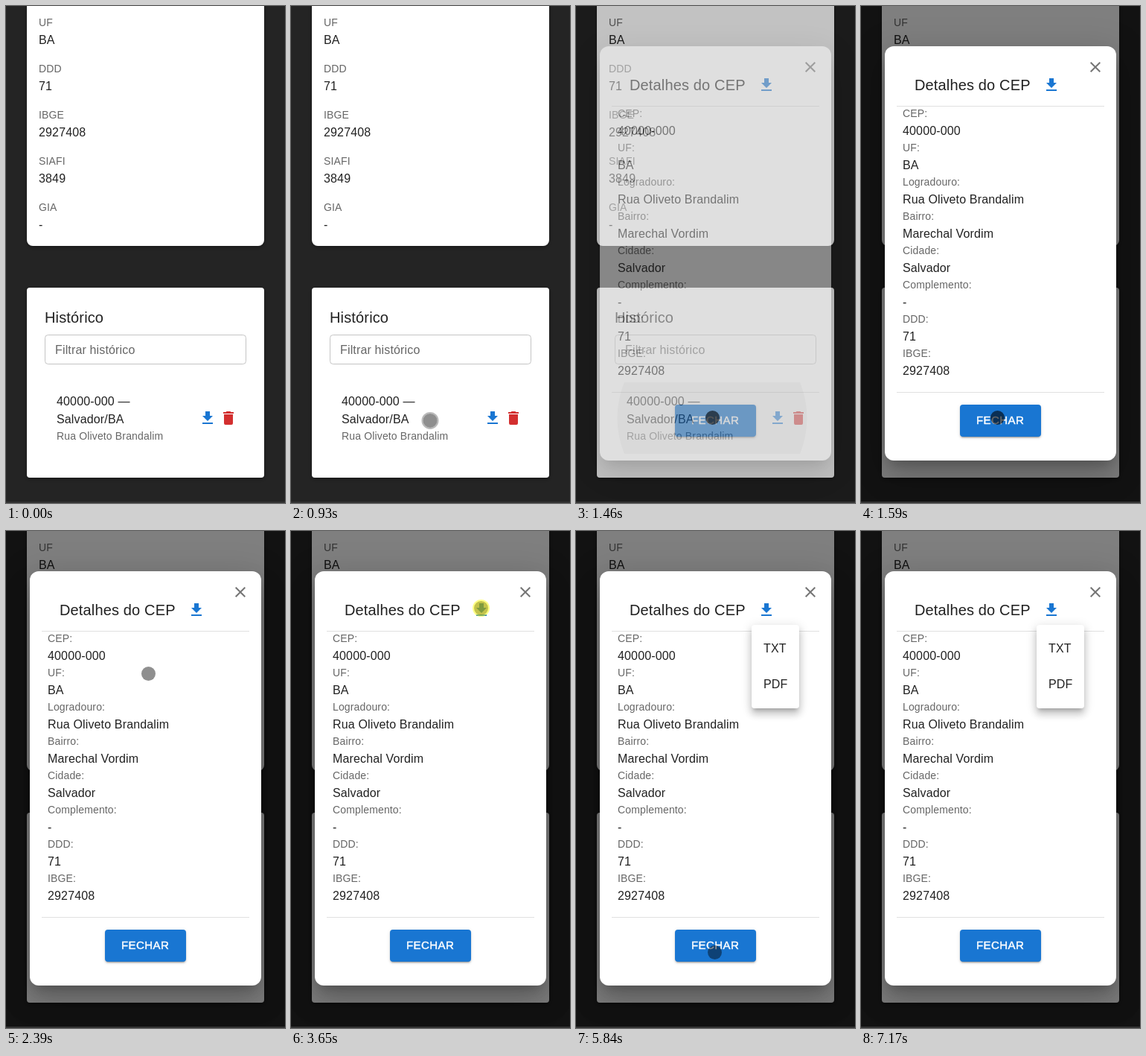
An HTML page for the animation above (7700 ms loop, 375 by 667 pixels).

```html
<!DOCTYPE html>
<html lang="pt-BR">
<head>
<meta charset="utf-8">
<title>Detalhes do CEP</title>
<style>
  html, body { margin: 0; width: 100%; height: 100%; overflow: hidden; background: #242424; }
  #stage { position: relative; width: 375px; height: 667px; overflow: hidden; }
  .layer, svg { position: absolute; left: 0; top: 0; width: 375px; height: 667px; }
  .panel { position: absolute; background: #fff; }
  .card { left: 28px; width: 319px; box-shadow: 0 2px 4px rgba(0,0,0,.3); }
  #result { top: -20px; height: 342px; border-radius: 8px; }
  #history { top: 378px; height: 255px; border-radius: 4px; }
  #backdrop { background: rgba(0,0,0,.5); }
  #paper {
    left: 32px; top: 54px; width: 311px; height: 556px; border-radius: 12px;
    box-shadow: 0 11px 15px -7px rgba(0,0,0,.2), 0 24px 38px 3px rgba(0,0,0,.14), 0 9px 46px 8px rgba(0,0,0,.12);
  }
  #close {
    left: 133px; top: 535px; width: 109px; height: 42.5px; border-radius: 4px; background: #1976d2;
    box-shadow: 0 3px 1px -2px rgba(0,0,0,.2), 0 2px 2px rgba(0,0,0,.14), 0 1px 5px rgba(0,0,0,.12);
  }
  #menu { transform-origin: 236px 126px; }
  #menu .panel {
    left: 236px; top: 126px; width: 64px; height: 112px; border-radius: 4px;
    box-shadow: 0 5px 5px -3px rgba(0,0,0,.2), 0 8px 10px 1px rgba(0,0,0,.14), 0 3px 14px 2px rgba(0,0,0,.12);
  }
  #edge { position: absolute; left: 0; top: 665px; width: 375px; height: 2px; background: #333; }
  text { font: 16px "Liberation Sans", Arial, sans-serif; letter-spacing: .15px; fill: #212121; white-space: pre; }
  .label { font-size: 14px; fill: #666; }
  .title { font-size: 20px; }
  .hint { fill: #666; }
  .button { font-size: 15px; letter-spacing: .43px; fill: #fff; stroke: #fff; stroke-width: .45px; }
</style>
</head>
<body>
<div id="stage">
  <div class="layer">
    <div class="panel card" id="result"></div>
    <div class="panel card" id="history"></div>
    <svg id="pageArt">
      <clipPath id="row"><rect x="52" y="505" width="271" height="96"/></clipPath>
      <rect x="52.5" y="441.5" width="270" height="39" rx="4" fill="none" stroke="#c4c4c4"/>
      <g clip-path="url(#row)"><circle id="rowRipple" cx="183" cy="553"/></g>
    </svg>
  </div>
  <div class="layer" id="backdrop"></div>
  <div class="layer" id="dialog">
    <div class="panel" id="paper"></div>
    <div class="panel" id="close"></div>
    <svg id="dialogArt">
      <path d="M48 134.5H327M48 518.5H327" stroke="#e0e0e0"/>
      <circle id="iconRipple" cx="256" cy="106" fill="#1976d2"/>
    </svg>
  </div>
  <div class="layer" id="menu">
    <div class="panel"></div>
    <svg id="menuArt"></svg>
  </div>
  <div id="edge"></div>
  <svg>
    <g id="cursor">
      <circle id="ring" r="10.5" fill="none" stroke="#000" stroke-opacity=".27" stroke-width="2"/>
      <circle id="core" r="9.5"/>
      <circle id="click" r="11.5" fill="#ff0" fill-opacity=".47"/>
    </g>
  </svg>
</div>
<script>
const LOOP = 7700, TICK = LOOP / 116;
const $ = id => document.getElementById(id);

function add(parent, tag, attrs) {
  const el = document.createElementNS('http://www.w3.org/2000/svg', tag);
  for (const key in attrs) el.setAttribute(key, attrs[key]);
  return parent.appendChild(el);
}
const write = (parent, x, y, words, style = '') =>
  add(parent, 'text', { x, y, class: style }).textContent = words;
const icon = (parent, x, y, d, fill) =>
  add(parent, 'path', { d, fill, transform: `translate(${x} ${y})` });

const DOWNLOAD = 'M5 20h14v-2H5zM19 9h-4V3H9v6H5l7 7z';
const TRASH = 'M6 7h12v12q0 2-2 2H8q-2 0-2-2zM5 4h3.5l1-1h5l1 1H19v2H5z';
const CROSS = 'M5.7 5.7 18.3 18.3M18.3 5.7 5.7 18.3';
const BLUE = '#1976d2';
const CEP = '40000-000', STREET = 'Rua Oliveto Brandalim';

function fields(parent, x, y, pitch, rows) {
  Object.entries(rows).forEach(([label, value], i) => {
    write(parent, x, y + pitch * i, label, 'label');
    write(parent, x, y + pitch * i + 24, value);
  });
}

fields(pageArt, 44, 27, 62, { UF: 'BA', DDD: '71', IBGE: '2927408', SIAFI: '3849', GIA: '-' });
write(pageArt, 52, 425, 'Histórico', 'title');
write(pageArt, 66, 467, 'Filtrar histórico', 'hint');
write(pageArt, 68, 536, CEP + ' —');
write(pageArt, 68, 560, 'Salvador/BA');
write(pageArt, 68, 582, STREET, 'label');
icon(pageArt, 259, 541, DOWNLOAD, BLUE);
icon(pageArt, 287, 541, TRASH, '#d32f2f');

write(dialogArt, 72, 113, 'Detalhes do CEP', 'title');
icon(dialogArt, 244, 94, DOWNLOAD, BLUE);
const cross = icon(dialogArt, 303, 70, CROSS, 'none');
cross.setAttribute('stroke', '#757575');
cross.setAttribute('stroke-width', 2);
fields(dialogArt, 56, 149, 46, {
  'CEP:': CEP, 'UF:': 'BA', 'Logradouro:': STREET, 'Bairro:': 'Marechal Vordim',
  'Cidade:': 'Salvador', 'Complemento:': '-', 'DDD:': '71', 'IBGE:': '2927408'
});
write(dialogArt, 155, 561, 'FECHAR', 'button');
['TXT', 'PDF'].forEach((name, i) => write(menuArt, 252, 163 + 48 * i, name));

const ramp = (t, from, to) => Math.min(1, Math.max(0, (t - from) / (to - from)));
const ease = x => x * x * (3 - 2 * x);
const during = (t, from, to) => t >= from && t < to;

// The pointer glides from place to place, slowing slightly; bow bends its path sideways.
const BELOW = { x: 272, y: 651 }, ROW = { x: 183.5, y: 552.5 }, TURN = { x: 191.5, y: 191.5 };
const ICON = { x: 255.5, y: 103.5 }, BUTTON = { x: 186.5, y: 565.5 }, EXIT = { x: 258, y: 682 };
const glides = [
  { from: BELOW, to: ROW, start: 260, end: 990, bow: 0 },
  { from: ROW, to: TURN, start: 1800, end: 2390, bow: -55 },
  { from: TURN, to: ICON, start: 2390, end: 3260, bow: 0 },
  { from: ICON, to: BUTTON, start: 5380, end: 5840, bow: -75 },
  { from: BUTTON, to: EXIT, start: 6770, end: 7170, bow: 0 }
];

function movePointer(t) {
  const glide = glides.findLast(g => t >= g.start);
  const { from, to, start, end, bow } = glide || glides[0];
  const k = 1 - (1 - ramp(t, start, end)) ** 1.3;
  const x = from.x + (to.x - from.x) * k + bow * Math.sin(Math.PI * k);
  const y = from.y + (to.y - from.y) * k;
  $('cursor').setAttribute('transform', `translate(${x} ${y})`);
  $('cursor').style.display = glide ? '' : 'none';
  $('ring').style.display = t < end - TICK / 2 ? '' : 'none';
  $('core').setAttribute('fill-opacity', during(t, 1260, 1660) ? .6 : .44);
  $('click').style.display = during(t, 1060, 1260) || during(t, 3645, 3780) ? '' : 'none';
}

function ripple(el, radius, alpha) {
  el.setAttribute('r', radius);
  el.setAttribute('fill-opacity', alpha);
}

function render(t) {
  $('backdrop').style.opacity = $('dialog').style.opacity = ease(ramp(t, 1330, 1600));
  ripple($('rowRipple'), 148 * ease(ramp(t, 1200, 1540)), t < 1260 ? 0 : .12 * (1 - ramp(t, 1260, 1660)));
  ripple($('iconRipple'), 20 * ease(ramp(t, 3700, 4000)), .2 * (1 - ramp(t, 3850, 4380)));

  const grow = ease(ramp(t, 3840, 4100)), scale = .75 + .25 * grow;
  $('menu').style.opacity = grow;
  $('menu').style.transform = grow < 1 ? `scale(${scale}, ${scale * scale})` : 'none';
  movePointer(t);
}

// The picture advances in even ticks.
const begin = performance.now();
function frame() {
  const t = (performance.now() - begin) % LOOP;
  render(Math.floor((t + 6) / TICK) * TICK);
  requestAnimationFrame(frame);
}
frame();
</script>
</body>
</html>
```
